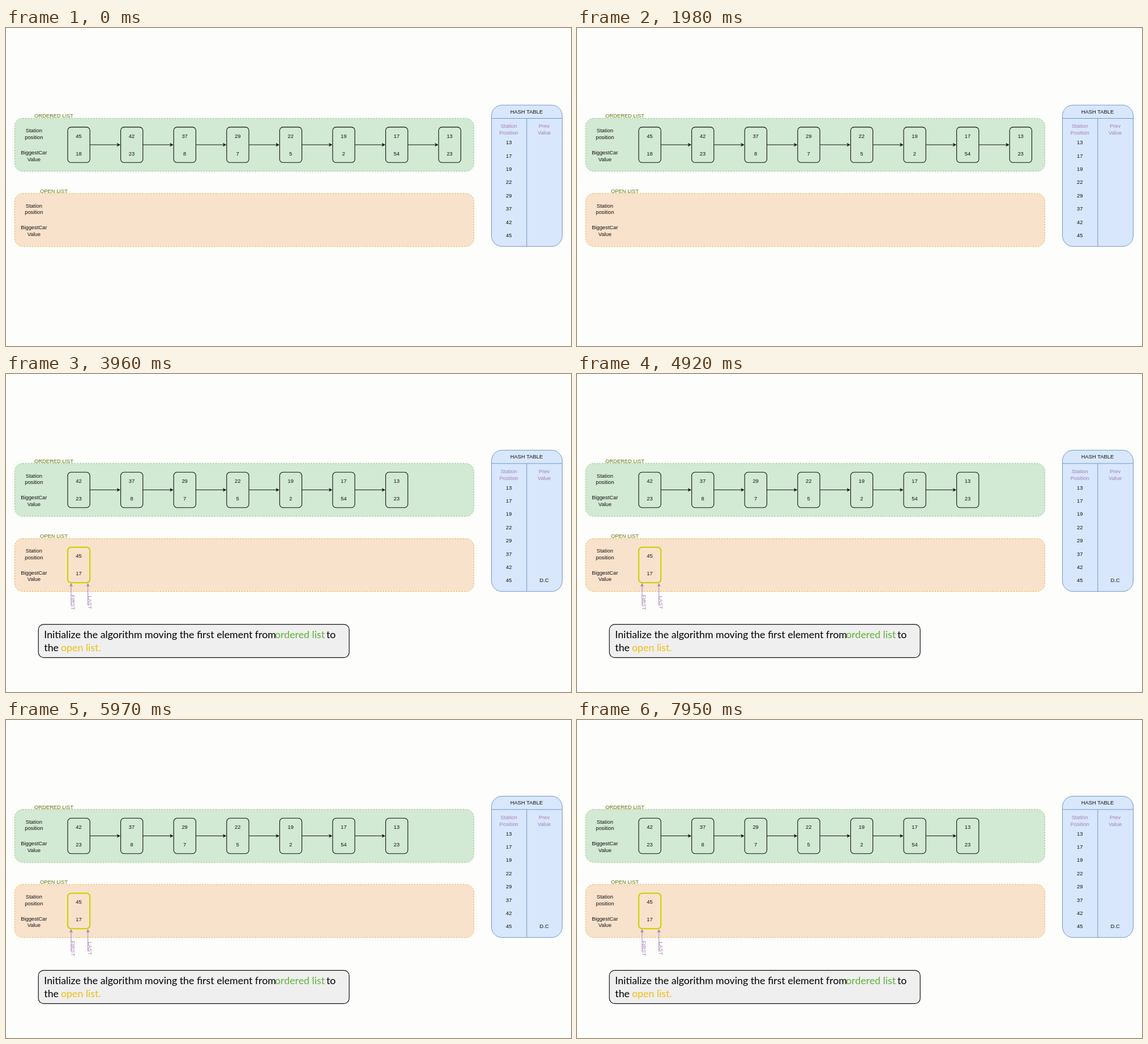
Animation, 998 px wide and 561 px high, one loop 8 s. Source, as an HTML page:

```html
<!DOCTYPE html>
<html lang="en">
<head>
<meta charset="utf-8">
<title>Ordered list and open list</title>
<style>
  html, body { margin: 0; width: 100%; height: 100%; overflow: hidden; background: #fdfdfc; }
  svg { display: block; width: 100vw; height: 100vh; }
  text { font: 9.36px "Liberation Sans", Arial, sans-serif; text-anchor: middle; fill: #111; }
  .caption text { font: 17.8px Lato, sans-serif; text-anchor: start; fill: #000; }
</style>
</head>
<body>
<svg id="stage" viewBox="0 0 998 561"></svg>
<script>
const LOOP = 8000, MOVE_AT = 3960;
const PITCH = 93.6, FIRST_X = 109;
const PURPLE = '#a680b8', BLUE = '#7397c8';
const stations = [[45, 18], [42, 23], [37, 8], [29, 7], [22, 5], [19, 2], [17, 54], [13, 23]];

const svg = document.getElementById('stage');

function add(parent, tag, attrs, content) {
  const el = document.createElementNS('http://www.w3.org/2000/svg', tag);
  for (const key in attrs) el.setAttribute(key, attrs[key]);
  if (content !== undefined) el.textContent = content;
  parent.appendChild(el);
  return el;
}

// y is the vertical middle of the capitals
function label(parent, x, y, content, color = '#111') {
  return add(parent, 'text', { x, y: y + 3.4, style: `fill:${color}` }, content);
}

function box(parent, x, y, width, height, rx, fill, stroke, extra) {
  return add(parent, 'rect', { x, y, width, height, rx, fill, stroke, ...extra });
}

function line(parent, d, stroke) {
  return add(parent, 'path', { d, stroke, fill: 'none', 'stroke-width': 1 });
}

function arrow(parent, x, y, length, angle, color) {
  const g = add(parent, 'g', { transform: `translate(${x} ${y}) rotate(${angle})` });
  line(g, `M${-length} 0H-4`, color);
  add(g, 'path', { d: 'M0 0L-6.4 3.2L-4.8 0L-6.4 -3.2Z', fill: color });
}

function panel(parent, y, title, fill, stroke) {
  box(parent, 15.4, y, 811, 93.4, 14, fill, stroke, { 'stroke-dasharray': '2.4 2.4' });
  label(parent, 84.5, y - 4.6, title, '#66700a');
  ['Station', 'position', 'BiggestCar', 'Value'].forEach((word, i) =>
    label(parent, 49.3, y + [21.4, 33, 60, 71.8][i], word));
}

function node(parent, x, y, [position, value], stroke = '#111', width = 1.1) {
  box(parent, x, y, 39.2, 62.4, 5.9, 'none', stroke, { 'stroke-width': width });
  label(parent, x + 19.4, y + 15.2, position);
  label(parent, x + 19.4, y + 46.4, value);
}

function chain(parent, items) {
  const g = add(parent, 'g', {});
  items.forEach((item, i) => {
    const x = FIRST_X + i * PITCH;
    node(g, x, 174.9, item);
    if (i) arrow(g, x - 0.5, 206, 53.6, 0, '#111');
  });
  return g;
}

function hashTable(parent) {
  box(parent, 857.5, 136, 125, 249.3, 18.7, '#d8e7fb', BLUE);
  line(parent, 'M857.5 159.5H982.5M919.8 159.5V385.3', BLUE);
  label(parent, 919.5, 147.3, 'HASH TABLE');
  [['Station', 'Position', 888.2], ['Prev', 'Value', 950.6]].forEach(([top, bottom, x]) => {
    label(parent, x, 173, top, PURPLE);
    label(parent, x, 184.8, bottom, PURPLE);
  });
  stations.map(s => s[0]).reverse().forEach((position, i) =>
    label(parent, 888.2, 201.8 + i * 23.4, position));
}

function pointer(parent, x, name) {
  arrow(parent, x, 370.4, 39, -90, PURPLE);
  add(parent, 'text', {
    transform: `translate(${x + 0.3} 404.6) rotate(90)`, style: `fill:${PURPLE}`
  }, name);
}

function caption(parent) {
  const g = add(parent, 'g', { class: 'caption' });
  box(g, 57.2, 441.6, 549, 58.8, 9.5, '#efeff0', '#111', { 'stroke-width': 1.2 });
  const say = (x, y, words, color = '#000') =>
    add(g, 'text', { x, y, style: `fill:${color}` }, words);
  say(67.3, 466.3, 'Initialize the algorithm moving the first element from');
  say(475, 466.3, 'ordered list', '#62b136');
  say(566, 466.3, 'to');
  say(67.3, 488.7, 'the');
  say(97, 488.7, 'open list.', '#f1bd10');
  return g;
}

const diagram = add(svg, 'g', {});
panel(diagram, 159.4, 'ORDERED LIST', '#d2e9d3', '#83c47d');
panel(diagram, 291.9, 'OPEN LIST', '#f9e2cc', '#e3ae35');
hashTable(diagram);

const before = chain(diagram, stations);
const after = add(diagram, 'g', {});
chain(after, stations.slice(1));
node(after, FIRST_X, 307.3, [45, 17], '#cdd20c', 2.3);
pointer(after, 115, 'FIRST');
pointer(after, 144.7, 'LAST');
label(after, 950.6, 365.6, 'D.C');
const note = caption(svg);

function draw(time) {
  const moved = time % LOOP >= MOVE_AT;
  const show = (el, on) => el.setAttribute('visibility', on ? 'visible' : 'hidden');
  show(before, !moved);
  show(after, moved);
  show(note, moved);
  diagram.setAttribute('transform', `translate(0 ${moved ? -1.6 : 0})`);
}

const start = performance.now();
function tick() {
  draw(performance.now() - start);
  requestAnimationFrame(tick);
}
tick();
</script>
</body>
</html>
```
